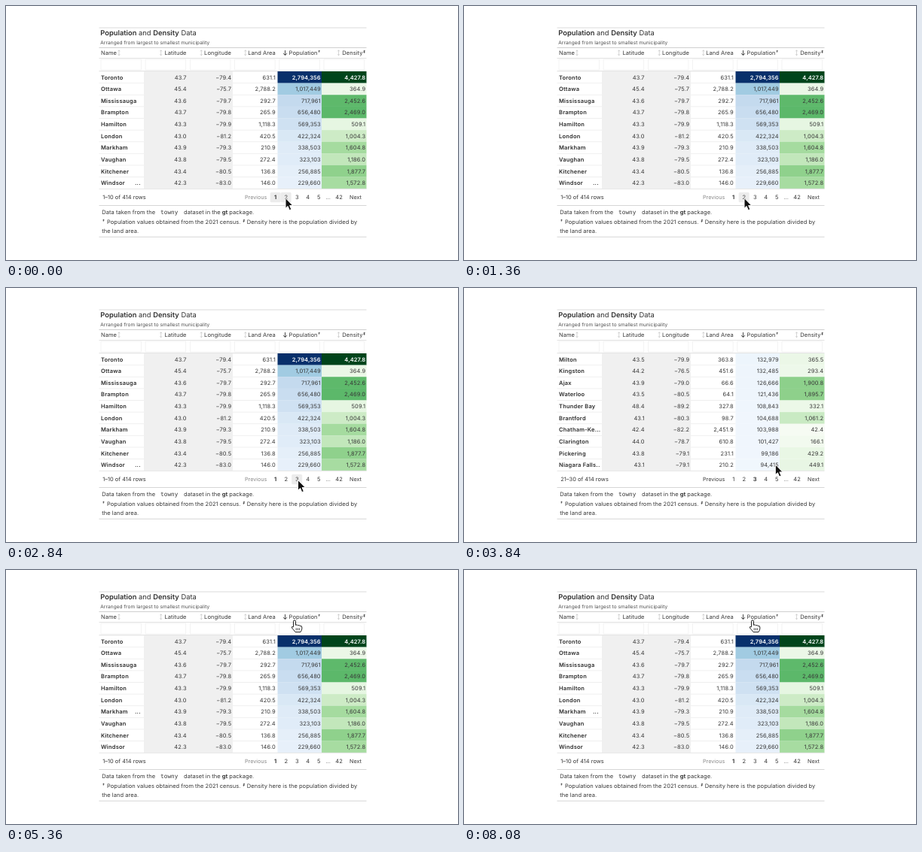
Animation of 600x338 px, one loop 8.56 s. Source, as an HTML page with a canvas:

```html
<!DOCTYPE html>
<html lang="en">
<head>
<meta charset="utf-8">
<title>Population and Density Data</title>
<style>
html, body { margin: 0; width: 100%; height: 100%; overflow: hidden; background: #fff; }
canvas { display: block; width: 600px; height: 338px; }
</style>
</head>
<body>
<canvas id="stage"></canvas>
<script>
const LOOP = 8560;
const canvas = document.getElementById('stage');
const ratio = window.devicePixelRatio || 1;
canvas.width = 600 * ratio;
canvas.height = 338 * ratio;
const ctx = canvas.getContext('2d');

// name | latitude | longitude | land area | population | density
const parse = s => s.trim().split('\n').map(row => row.split('|'));
const first = parse(`
Toronto|43.7|−79.4|631.1|2,794,356|4,427.8
Ottawa|45.4|−75.7|2,788.2|1,017,449|364.9
Mississauga|43.6|−79.7|292.7|717,961|2,452.6
Brampton|43.7|−79.8|265.9|656,480|2,469.0
Hamilton|43.3|−79.9|1,118.3|569,353|509.1
London|43.0|−81.2|420.5|422,324|1,004.3
Markham|43.9|−79.3|210.9|338,503|1,604.8
Vaughan|43.8|−79.5|272.4|323,103|1,186.0
Kitchener|43.4|−80.5|136.8|256,885|1,877.7
Windsor|42.3|−83.0|146.0|229,660|1,572.8`);
const second = parse(`
Oakville|43.5|−79.7|138.9|213,759|1,538.5
Richmond Hill|43.9|−79.4|100.8|202,022|2,004.4
Burlington|43.4|−79.8|186.1|186,948|1,004.5
Oshawa|43.9|−78.9|145.7|175,383|1,203.6
Greater Sud...|46.6|−81.1|3,186.3|166,004|52.1
Barrie|44.4|−79.7|99.0|147,829|1,493.1
Guelph|43.5|−80.2|87.4|143,740|1,644.1
Whitby|43.9|−78.9|146.7|138,501|944.2
Cambridge|43.4|−80.3|113.0|138,479|1,225.6
St. Catharin...|43.2|−79.2|96.2|136,803|1,422.1`);
const third = parse(`
Milton|43.5|−79.9|363.8|132,979|365.5
Kingston|44.2|−76.5|451.6|132,485|293.4
Ajax|43.9|−79.0|66.6|126,666|1,900.8
Waterloo|43.5|−80.5|64.1|121,436|1,895.7
Thunder Bay|48.4|−89.2|327.8|108,843|332.1
Brantford|43.1|−80.3|98.7|104,688|1,061.2
Chatham-Ke...|42.4|−82.2|2,451.9|103,988|42.4
Clarington|44.0|−78.7|610.8|101,427|166.1
Pickering|43.8|−79.1|231.1|99,186|429.2
Niagara Falls..|43.1|−79.1|210.2|94,415|449.1`);
const smallest = parse(`
Cockburn Isl...|45.9|−83.4|170.6|16|0.1
Thornloe|47.7|−79.8|6.6|92|13.9
Brethour|47.7|−79.6|83.1|105|1.3
Gauthier|48.1|−80.0|88.6|151|1.7
Mattawan|46.3|−78.9|200.2|153|0.8
Hilton Beach|46.3|−83.9|2.5|198|79.2
Opasatika|49.5|−82.9|329.1|200|0.6
Hilliard|47.7|−79.7|91.0|215|2.4
Pelee|41.8|−82.7|41.8|230|5.5
Head, Clara...|46.2|−77.8|726.0|267|0.4`);

// ghost: row where a stray ellipsis lingers
const views = [
  { at: 0, rows: first, page: 1, ghost: 9 },
  { at: 1560, rows: second, page: 2 },
  { at: 2160, rows: first, page: 1, ghost: 9 },
  { at: 3160, rows: third, page: 3 },
  { at: 4720, rows: smallest, page: 1, up: true },
  { at: 5240, rows: first, page: 1, ghost: 6 }
];

const palette = s => s.split(' ').map(h => [0, 2, 4].map(i => parseInt(h.substr(i, 2), 16)));
const blues = palette('f7fbff deebf7 c6dbef 9ecae1 6baed6 4292c6 2171b5 08519c 08306b');
const greens = palette('f7fcf5 e5f5e0 c7e9c0 a1d99b 74c476 41ab5d 238b45 006d2c 00441b');
const shade = (stops, t) => {
  const i = Math.min(7, Math.floor(t * 8)), f = t * 8 - i;
  return `rgb(${stops[i].map((v, k) => Math.round(v + (stops[i + 1][k] - v) * f))})`;
};
const number = s => +s.replace(/,/g, '');

const INK = '#383838', TOP = 87, STEP = 15.62;
const ROWS_END = TOP + 10 * STEP;

function text(s, x, y, { size = 7.5, weight = 400, color = INK, align = 'left', gap = 0.05,
                         family = 'Inter, sans-serif', style = 'normal' } = {}) {
  ctx.font = `${style} ${weight} ${size}px ${family}`;
  ctx.letterSpacing = gap + 'px';
  ctx.textRendering = 'geometricPrecision';
  ctx.textAlign = align;
  ctx.fillStyle = color;
  ctx.fillText(s, x, y);
  return x + ctx.measureText(s).width;
}
function box(x, y, w, h, color) {
  ctx.fillStyle = color;
  ctx.fillRect(x, y, w, h);
}
function stroke(path, color, width) {
  ctx.strokeStyle = color;
  ctx.lineWidth = width;
  ctx.stroke(new Path2D(path));
}
const rule = (y, color) => box(123.5, y, 355, 1, color);
const mark = (s, x, y) => text(s, x, y, { size: 5.8, weight: 700, style: 'italic', gap: 0 });
const sortIcon = x => stroke(`M${x - 1.4} 60.3l1.4 -1.6 1.4 1.6M${x} 58.8V65.8M${x - 1.4} 64.2l1.4 1.6 1.4 -1.6`, '#bbb', 0.6);

function drawHeader(up) {
  rule(28.5, '#dcdcdc');
  let x = 125.3;
  [['Population', 600], [' and ', 400], ['Density', 600], [' Data', 400]].forEach(([s, weight]) => {
    x = text(s, x, 39.4, { size: 9.35, weight, gap: 0, color: '#303030' });
  });
  text('Arranged from largest to smallest municipality', 125.3, 50.6, { size: 6.5, gap: 0.08, color: '#4c4c4c' });
  rule(55, '#cfcfcf');
  text('Name', 126, 65);
  [['Latitude', 239.5], ['Longitude', 299], ['Land Area', 357.8], ['Population', 413.6], ['Density', 473.5]]
    .forEach(([s, right]) => text(s, right, 65, { align: 'right' }));
  [150, 205.7, 259.3, 317.8, 441.5].forEach(sortIcon);
  stroke(up ? 'M370.5 65.5V59M368 61.5l2.5 -2.5 2.5 2.5' : 'M370.5 59V65.5M368 63l2.5 2.5 2.5 -2.5', INK, 0.9);
  mark('†', 413.8, 63);
  mark('‡', 473.8, 63);
  rule(69, '#e2e2e2');
  for (let i = 0; i < 6; i++) {
    ctx.strokeStyle = '#f0f0f0';
    ctx.lineWidth = 0.8;
    ctx.strokeRect(126 + i * 59.2, 71, 53.5, 14);
  }
}

function drawRows({ rows, ghost }) {
  rule(86.2, '#dedede');
  box(183, TOP, 118, ROWS_END - TOP, '#f0f0f0');
  rows.forEach((row, i) => {
    const y = TOP + i * STEP, base = y + 10.6;
    if (i) {
      box(123.5, y - 0.4, 59.5, 0.8, '#ececec');
      box(301, y - 0.4, 59.5, 0.8, '#ececec');
    }
    text(row[0], 126, base, { weight: 600, gap: 0.2, color: '#2c2c2c' });
    if (i === ghost) text('...', 171, base, { weight: 600, gap: 0.2 });
    [239.7, 299.2, 357.8].forEach((right, k) => text(row[k + 1], right, base, { align: 'right', gap: 0.1 }));
    [[4, 360.5, 58.5, blues, 2794356], [5, 419, 59.5, greens, 4427.8]].forEach(([k, left, w, stops, max]) => {
      const t = number(row[k]) / max, dark = t > 0.6;
      box(left, y, w, STEP + 0.1, shade(stops, t));
      text(row[k], left + w - 1.3, base,
        { align: 'right', gap: 0.1, weight: dark ? 600 : 400, color: dark ? '#fff' : INK });
    });
  });
  rule(ROWS_END - 0.3, '#e6e6e6');
}

const buttons = [357.7, 371.7, 386.2, 400.7, 415.2, 442];
function drawPager(page, cursor, t) {
  const y = 257.2, from = page * 10 - 9;
  text(`${from}–${from + 9} of 414 rows`, 128.3, y, { size: 7.45, gap: 0 });
  text('Previous', 317, y, { size: 7.2, gap: 0, color: page === 1 ? '#888' : INK });
  buttons.forEach((x, i) => {
    const over = cursor.y > 247 && cursor.y < 262 && Math.abs(cursor.x - x) < 7.2;
    if (over || (i === 0 && t < 40)) {
      ctx.fillStyle = '#ececec';
      ctx.beginPath();
      ctx.roundRect(x - 7, 248, 14, 13.2, 1.5);
      ctx.fill();
    }
    text(i === 5 ? '42' : i + 1, x, y, { align: 'center', gap: 0, weight: page === i + 1 ? 700 : 400 });
  });
  text('...', 427.6, y, { align: 'center', gap: 0 });
  text('Next', 456, y, { size: 7.2, gap: 0 });
}

function drawNotes() {
  rule(265, '#d6d6d6');
  text('Data taken from the', 127.3, 277);
  text('towny', 205, 277, { size: 7.8, gap: 0, family: '"DejaVu Sans Mono", monospace' });
  text('dataset in the', 236, 277);
  text('gt', 286.7, 277, { weight: 700 });
  text('package.', 296.3, 277);
  mark('†', 127.6, 287.8);
  text('Population values obtained from the 2021 census.', 134, 289.7, { gap: 0.02 });
  mark('‡', 314, 287.8);
  text('Density here is the population divided by', 319.8, 289.7);
  text('the land area.', 127.3, 301.8);
  rule(306.8, '#d6d6d6');
}

const ease = (t, a, b) => {
  const k = Math.min(1, Math.max(0, (t - a) / (b - a)));
  return k * k * (3 - 2 * k);
};
function cursorAt(t) {
  const x = 371 + ease(t, 480, 1040) - 10 * ease(t, 1680, 2040) + 25.5 * ease(t, 2280, 2840);
  const k = ease(t, 3640, 4520), j = 1 - k;
  // bows out to the right on its way up to the column heading
  return { x: j * j * x + 2 * j * k * 500 + k * k * 383, y: j * j * 255.5 + 2 * j * k * 180 + k * k * 67.3 };
}
const arrow = new Path2D('M0 0V13.8L3.1 10.9L5.3 16.2L7.8 15.1L5.6 10.1H9.8Z');
const hand = new Path2D('M-1.5 8V1Q-1.5 -.5 0 -.5T1.5 1V6Q3.5 4.8 4.3 6.6Q6.3 5.4 7.2 7.2Q9.6 6.3 9.8 8.8V11Q9.5 13 8 15.3H1Q-1 12.5 -3.6 9.6Q-4.2 7.2 -1.5 8.6Z');
function drawCursor({ x, y }) {
  const pointing = y < 70;
  ctx.save();
  ctx.translate(x, y);
  ctx.lineJoin = 'round';
  ctx.lineWidth = 1;
  ctx.fillStyle = pointing ? '#fff' : '#111';
  ctx.strokeStyle = pointing ? '#222' : '#fff';
  const shape = pointing ? hand : arrow;
  ctx.fill(shape);
  ctx.stroke(shape);
  if (pointing) {
    ctx.lineWidth = 0.8;
    ctx.stroke(new Path2D('M2.2 10V13M4.3 10V13M6.4 10V13'));
  }
  ctx.restore();
}

function draw(now) {
  const t = now % LOOP;
  const view = views.filter(v => v.at <= t).pop();
  const cursor = cursorAt(t);
  ctx.setTransform(ratio, 0, 0, ratio, 0, 0);
  box(0, 0, 600, 338, '#fff');
  drawHeader(view.up);
  drawRows(view);
  drawPager(view.page, cursor, t);
  drawNotes();
  drawCursor(cursor);
}
const start = performance.now();
function tick() {
  draw(performance.now() - start);
  requestAnimationFrame(tick);
}
tick();
</script>
</body>
</html>
```
